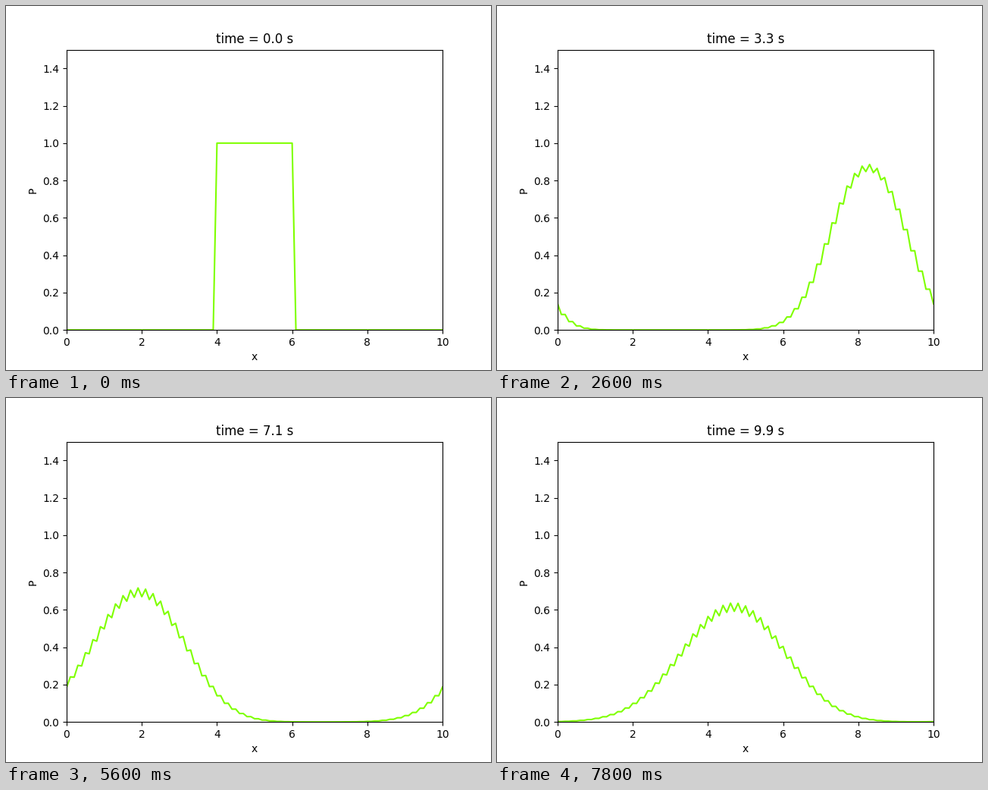
These frames come from a looping animation (640x480 px, 8 s). A matplotlib script:

```python
import numpy as np
import matplotlib.pyplot as plt
from matplotlib.animation import FuncAnimation

FRAMES = 40
INTERVAL = 200          # ms per frame
STEPS = 5               # time steps per frame
DT = 0.0507             # seconds per time step
COURANT = 0.5

x = np.linspace(0, 10, 101)


def advance(p):
    """One Lax-Friedrichs step of periodic advection to the right."""
    left, right = np.roll(p, 1), np.roll(p, -1)
    return 0.5 * (left + right) - 0.5 * COURANT * (right - left)


def solve():
    p = np.zeros_like(x)
    p[40:61] = 1.0
    states = [p]
    for _ in range(FRAMES - 1):
        for _ in range(STEPS):
            p = advance(p)
        states.append(p)
    return states


states = solve()

fig, ax = plt.subplots(figsize=(6.4, 4.8), dpi=100)
line, = ax.plot(x, states[0], color="chartreuse")
ax.set_xlim(0, 10)
ax.set_ylim(0, 1.5)
ax.set_xlabel("x")
ax.set_ylabel("P")
title = ax.set_title("time = 0.0 s")


def draw(i):
    line.set_ydata(states[i])
    title.set_text(f"time = {i * STEPS * DT:.1f} s")
    return line, title


anim = FuncAnimation(fig, draw, frames=FRAMES, interval=INTERVAL,
                     repeat=True, repeat_delay=0, blit=False)
plt.show()
```
